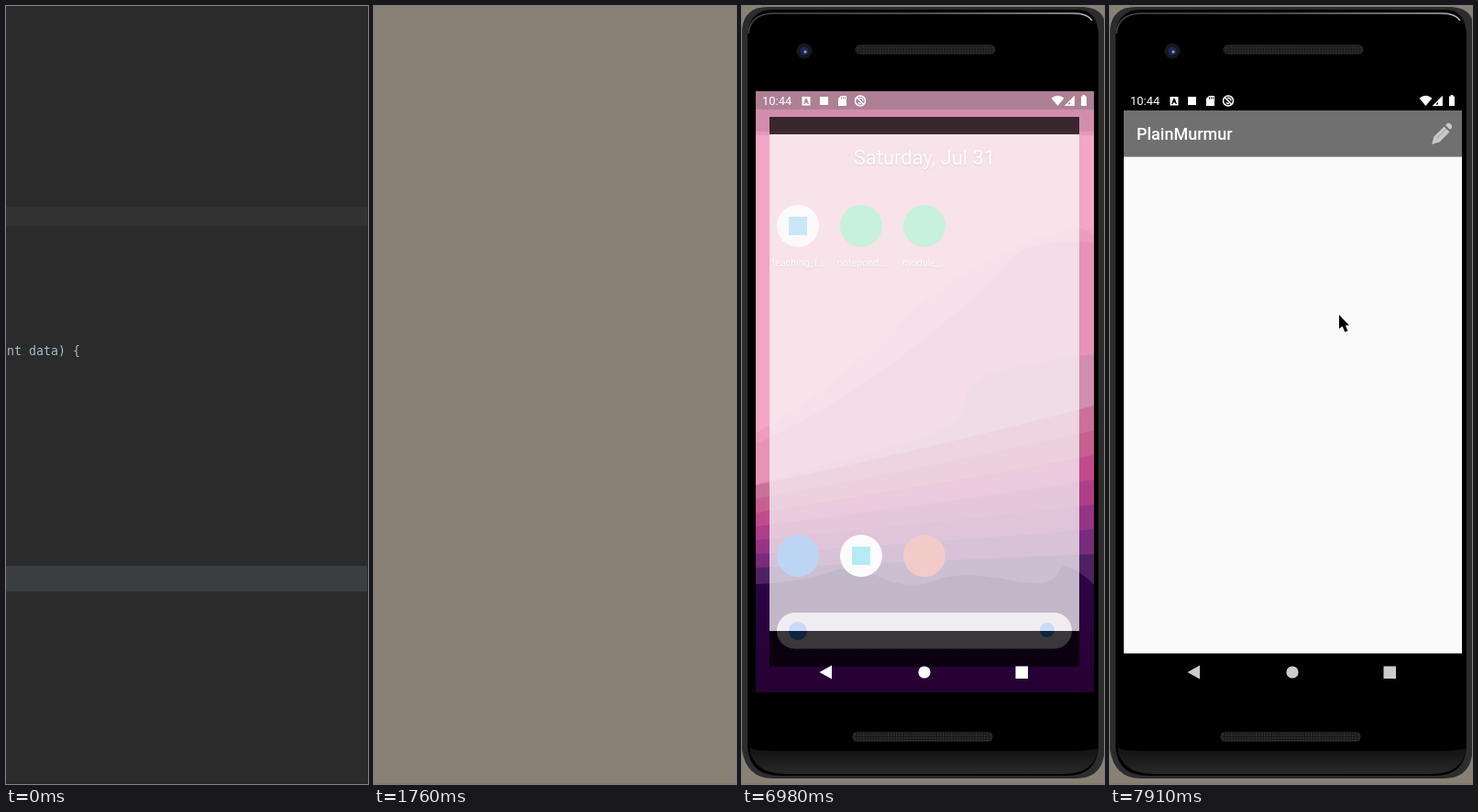
These frames come from a looping animation (395x849 px, 8 s). An HTML page:

```html
<!DOCTYPE html>
<html lang="en">
<head>
<meta charset="utf-8">
<title>Phone launch</title>
<style>
html, body { margin: 0; width: 100%; height: 100%; overflow: hidden; background: #888074; }
svg { display: block; }
text { font-family: Roboto, sans-serif; fill: #fff; white-space: pre; }
.code { font: 13.3px "DejaVu Sans Mono", monospace; fill: #a3bccf; }
.date { font-size: 22px; text-anchor: middle; }
.label { font-size: 10.8px; text-anchor: middle; }
.date, .label { text-shadow: 0 1px 2px #0006; }
.clock { font-size: 13px; }
.title { font-size: 18px; font-weight: 500; }
</style>
</head>
<body>
<svg width="395" height="849" viewBox="0 0 395 849">
  <defs>
    <linearGradient id="shine">
      <stop offset="0" stop-color="#444"/><stop offset=".5" stop-color="#666"/><stop offset="1" stop-color="#b5b5b5"/>
    </linearGradient>
    <linearGradient id="chin" x2="0" y2="1">
      <stop offset="0" stop-color="#111"/><stop offset="1" stop-color="#292929"/>
    </linearGradient>
    <linearGradient id="ground" x2="0" y2="1">
      <stop offset="0" stop-color="#2d0447"/><stop offset="1" stop-color="#260032"/>
    </linearGradient>
    <pattern id="mesh" width="3" height="3" patternUnits="userSpaceOnUse">
      <path d="M0 0h3v3H0z" fill="#1a1a1a"/><path d="M0 0h1.5v1.5H0z" fill="#343434"/>
    </pattern>
    <clipPath id="glass"><path d="M15 93h369v656H15z"/></clipPath>
  </defs>

  <g id="editor">
    <path d="M0 0h395v849H0z" fill="#2b2b2b"/>
    <path d="M0 219h395v21H0z" fill="#323232"/>
    <path d="M0 611.5h395v27H0z" fill="#4a4d4f"/>
    <path d="M0 612h395v26H0z" fill="#3c3f41"/>
    <path d="M394 0h1v849h-1zM0 846h395v3H0z" fill="#272727"/>
    <text class="code" x="1" y="381">nt data) {</text>
  </g>

  <path id="desktopEdge" d="M0 848h395v1H0z" fill="#81796d"/>

  <g id="phone">
    <path d="M0 26Q2 1 28 1H372Q390 2 395 14V818Q391 843 364 843H34Q5 843 0 812Z" fill="#2c2c2c"/>
    <path d="M6 32Q8 4 34 4H366Q386 4 389 28V810Q386 840 354 840H42Q9 840 6 810Z"/>
    <path d="M8 809Q12 813 40 813H355Q384 813 389 809Q386 838 350 838H48Q12 838 8 809Z" fill="url(#chin)"/>
    <path d="M7 30Q9 8 36 8H362Q377 8 382 16" fill="none" stroke="url(#shine)" stroke-width="1.5"/>
    <rect x="124" y="43" width="152" height="9" rx="4.5" fill="url(#mesh)" stroke="#333"/>
    <rect x="121" y="793" width="152" height="9" rx="4" fill="url(#mesh)" stroke="#333"/>
    <circle cx="68" cy="49" r="8.5" fill="#18161c"/>
    <circle cx="68" cy="49" r="4.5" fill="#23235c"/>
    <circle cx="69" cy="50" r="1.6" fill="#8f9cf0"/>

    <g id="home" clip-path="url(#glass)">
      <path d="M15 93h369v656H15z" fill="#f3a6c5"/>
      <path d="M15 466Q90 426 150 365T290 267T384 250V749H15Z" fill="#ee9cbe"/>
      <path d="M15 478Q100 440 185 374T290 280T384 258V749H15Z" fill="#e892b6"/>
      <path d="M15 522L200 470Q242 455 243 432T275 400Q330 385 384 380V749H15Z" fill="#d38db2"/>
      <g id="ridges"></g>
      <path d="M15 631Q70 628 95 618T150 623T210 627T290 626T345 618T384 631V749H15Z" fill="url(#ground)"/>
      <path d="M15 137h369v4H15z" fill="#e39ab9"/>
      <path d="M15 112h369v25H15z" fill="#d28dad"/>
      <path d="M15 93h369v20H15z" fill="#ae8095"/>
      <text class="date" x="199" y="173">Saturday, Jul 31</text>
      <g id="icons"></g>
      <rect x="38" y="662" width="322" height="39.5" rx="19.7" fill="#d6cdd9"/>
      <circle cx="61" cy="682" r="10" fill="#4285f4"/>
      <circle cx="333" cy="681" r="8" fill="#4285f4"/>
    </g>

    <g id="opening" opacity=".73">
      <path d="M30 121h338v600H30z"/>
      <path d="M30 140h338v542H30z" fill="#fafafa"/>
    </g>

    <g id="app">
      <path d="M15 93h369v656H15z"/>
      <path d="M15 114h369v592.500H15z" fill="#fafafa"/>
      <g id="toolbar">
        <path d="M15 114h369v50H15z" fill="#212121"/>
        <path d="M15 164h369v1H15z" fill="#777"/>
        <text class="title" x="29" y="146">PlainMurmur</text>
        <path d="M351 151l2.500-8.500 11-11 6 6-11 11zM366 130l2-2q2-1 4 1t1 4l-2 2z" fill="#ababab"/>
        <path d="M356 145l11-11" stroke="#666"/>
      </g>
    </g>

    <g fill="#fff">
      <text class="clock" x="22" y="108">10:44</text>
      <path fill-rule="evenodd" d="M65.500 99h9v9.500h-9zM67 107l2.300-6h1.400l2.300 6h-1.400l-.5-1.400h-2.200l-.5 1.400z"/>
      <path d="M85 99h9v9h-9z"/>
      <path fill-rule="evenodd" d="M108 98h6v11h-9v-8zM108 99.500v2h1v-2zM110 99.500v2h1v-2zM112 99.500v2h1v-2z"/>
      <g fill="none" stroke="#fff" stroke-width="1.500">
        <circle cx="129" cy="103.500" r="5.500"/>
        <path d="M125.500 100l7 7M127 105.500a3 3 0 0 0 3 1M128 100.500a3 3 0 0 1 4 3"/>
        <path d="M353.500 108.300h8.700V99.500z"/>
      </g>
      <path d="M337.500 100.500Q344.500 95 351.500 100.500L344.500 109ZM358 103.500l4-4v9h-4z"/>
      <path d="M370 98.500h1.700V97h2.600v1.500H376V109h-6z"/>
    </g>
    <g id="nav" fill="#fff">
      <path d="M84.500 727L98 719.500V734.500ZM298.500 720.500h13.500v13.500h-13.500z"/>
      <circle cx="199" cy="727" r="6.600"/>
    </g>
  </g>

  <path id="cursor" d="M0 0V15L3.700 12.500 6.200 18.800 9.500 17.500 6.800 11.600H11Z"/>
</svg>
<script>
const LOOP = 8000;
const $ = id => document.getElementById(id);
const clamp = (v, max) => Math.max(0, Math.min(max, v));

// Ridges fan out to the right and darken from pink to violet.
const RIDGES = 7;
$('ridges').innerHTML = Array.from({ length: RIDGES }, (_, i) => {
  const depth = i / (RIDGES - 1);
  const left = 523 + 15 * i;
  const right = 436 + 27 * i;
  const hue = 333 - 52 * depth ** 2;
  const light = 62 - 36 * depth ** 1.2;
  return `<path fill="hsl(${hue} 48% ${light}%)" d="M15 ${left}Q220 ${(left + right) / 2} 384 ${right}V749H15Z"/>`;
}).join('');

// Two rows of three apps on one grid.
const apps = [
  { name: 'teaching_f…', fill: '#fbfbfb', mark: '#47b4f0' },
  { name: 'notepond…', fill: '#3ddc84' },
  { name: 'module_…', fill: '#3ddc84' },
  { fill: '#1a73e8' },
  { fill: '#fff', mark: '#00c6e8' },
  { fill: '#dd4f43' }
];
$('icons').innerHTML = apps.map(({ name, fill, mark }, i) => {
  const x = 61 + 69 * (i % 3);
  const y = i < 3 ? 240 : 600;
  return `<circle cx="${x}" cy="${y}" r="23" fill="${fill}"/>` +
    (mark ? `<rect x="${x - 10}" y="${y - 10}" width="20" height="20" fill="${mark}"/>` : '') +
    (name ? `<text class="label" x="${x}" y="${y + 44}">${name}</text>` : '');
}).join('');

const show = (id, on) => { $(id).style.display = on ? '' : 'none'; };

function cursorAt(t) {
  if (t >= 1640 && t < 1760) return [319, -15];
  if (t >= 6160 && t < 6560) {
    const p = clamp(Math.floor((t - 6160) / 120), 2) / 2;
    const eased = p * (1.6 - .6 * p);
    return [42 + 206 * eased, 522 - 213 * eased];
  }
  return t >= 7390 ? [250, 337] : null;
}

function draw(t) {
  show('editor', t < 1490);
  show('desktopEdge', t >= 1490);
  show('phone', t >= 5320);
  show('home', t < 7130);
  show('opening', t >= 6980 && t < 7130);
  show('app', t >= 7130);

  const cursor = cursorAt(t);
  show('cursor', cursor);
  if (cursor) $('cursor').setAttribute('transform', `translate(${cursor})`);

  // The toolbar fades in while the navigation dims, in six even steps.
  const fade = clamp(Math.floor((t - 7130) / 130), 6) / 6;
  $('toolbar').style.opacity = .63 * fade;
  $('nav').style.opacity = 1 - .2 * fade;
}

const start = performance.now();
function tick() {
  draw((performance.now() - start) % LOOP);
  requestAnimationFrame(tick);
}
tick();
</script>
</body>
</html>
```
